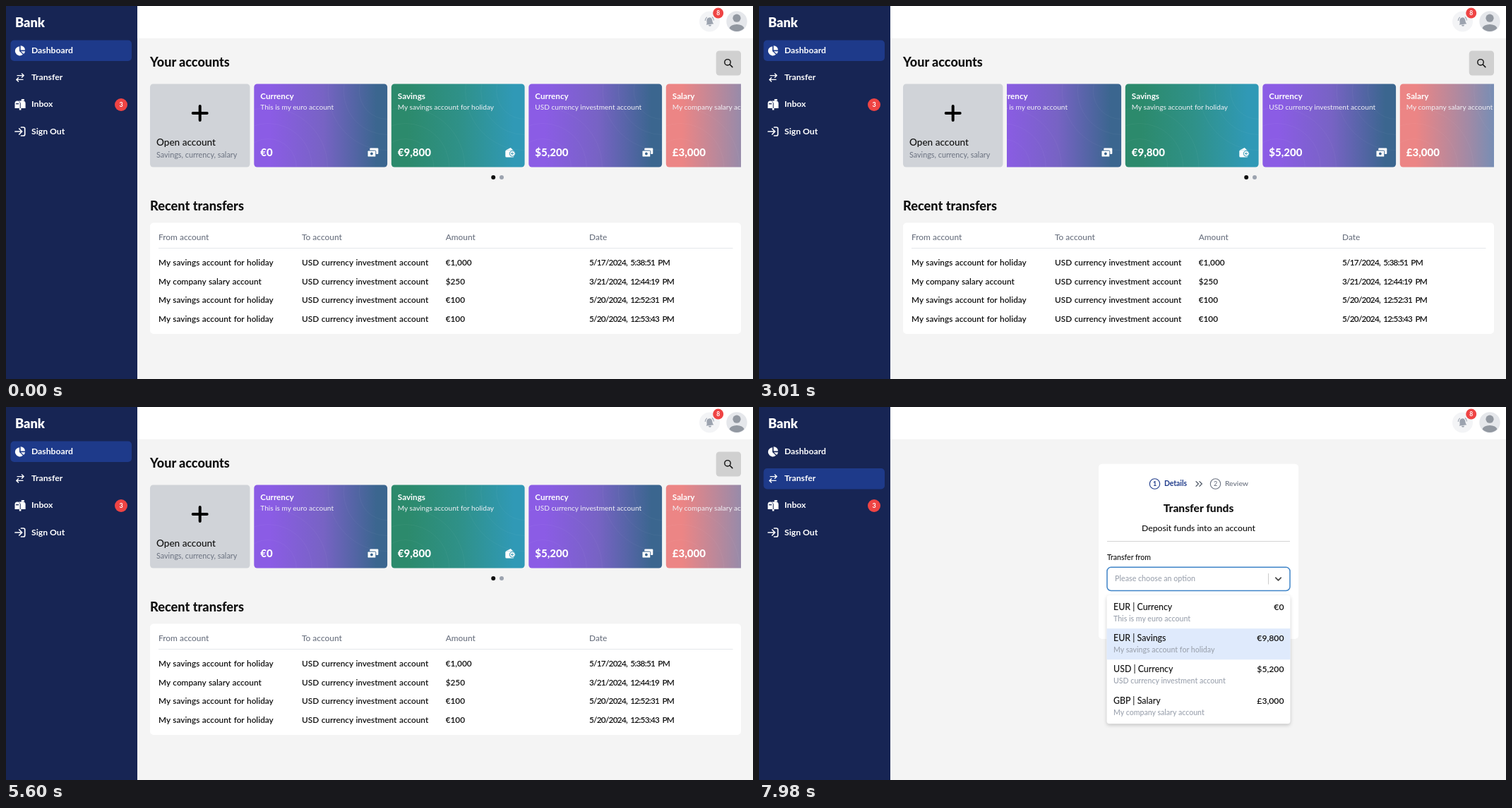
Animation, 1058 px wide and 529 px high, one loop 8 s. Source, as an HTML page:

```html
<!DOCTYPE html>
<html lang="en">
<head>
<meta charset="utf-8">
<title>Bank dashboard</title>
<style>
  html, body { margin: 0; width: 100%; height: 100%; overflow: hidden; background: #f4f4f4; }
  svg { display: block; width: 1058px; height: 529px; font-family: Lato, sans-serif; }
  text { white-space: pre; }
  .row { word-spacing: .6px; }
  .date { letter-spacing: -.75px; word-spacing: 2px; }
  .line { fill: none; stroke-linecap: round; stroke-linejoin: round; }
</style>
</head>
<body>
<svg id="stage" viewBox="0 0 1058 529"></svg>
<script>
const LOOP = 8000;
const NAVY = '#172554', BLUE = '#1e3a8a', RED = '#ef4444', INK = '#101010',
      GREY = '#6b7280', SOFT = '#9ca3af';

const text = (x, y, str, size, weight = 500, fill = INK, extra = '') =>
  `<text x="${x}" y="${y}" font-size="${size}" font-weight="${weight}" fill="${fill}" ${extra}>${str}</text>`;
const rect = (x, y, w, h, r, fill, extra = '') =>
  `<rect x="${x}" y="${y}" width="${w}" height="${h}" rx="${r}" fill="${fill}" ${extra}/>`;
const circle = (x, y, r, fill, extra = '') =>
  `<circle cx="${x}" cy="${y}" r="${r}" fill="${fill}" ${extra}/>`;
const path = (d, fill, extra = '') => `<path d="${d}" fill="${fill}" ${extra}/>`;
const line = (d, color, width, extra = '') =>
  `<path class="line" d="${d}" stroke="${color}" stroke-width="${width}" ${extra}/>`;
const MID = 'text-anchor="middle"', END = 'text-anchor="end"';

// Sidebar and header
const navIcons = [
  path('M19 57.2V64l4.9 4.7A6.6 6.6 0 1 1 19 57.2Z', '#fff') +
    path('M20.6 56.2a6.4 6.4 0 0 1 6.4 6.4h-6.4Z', '#fff') +
    path('M21 64.2h6a6.4 6.4 0 0 1-1.9 3.9Z', '#fff'),
  line('M16 98.6h9M22.5 96l2.7 2.6-2.7 2.6M24 104.4h-9M17.5 101.8l-2.7 2.6 2.7 2.6', '#fff', 1.4),
  path('M12.5 138a3.6 3.6 0 0 1 7.2 0v7h-7.2Z', '#fff') +
    path('M18 134.4h6a3.6 3.6 0 0 1 3.6 3.6v7H20.7v-7a5 5 0 0 0-2.7-3.6Z', '#fff') +
    path('M21.8 132h4v2.6h-2.6v4h-1.4ZM18.8 145h2.6v2.6h-2.6Z', '#fff') +
    rect(14, 138, 4, 1.3, 0, NAVY),
  line('M13 178h9M18.7 174l4 4-4 4M21.5 172h3.2a2 2 0 0 1 2 2v8a2 2 0 0 1-2 2h-3.2', '#fff', 1.7)
];
const nav = ['Dashboard', 'Transfer', 'Inbox', 'Sign Out'].map((label, i) =>
  navIcons[i] + text(36, 66.7 + i * 38.3, label, 12.2, 700, '#fff')).join('');

const sidebar = rect(0, 0, 186, 529, 0, NAVY) +
  rect(6.5, 48.5, 171.5, 29.5, 5, BLUE, 'id="navHome"') +
  rect(6.5, 87, 171.5, 29.5, 5, BLUE, 'id="navTransfer"') +
  text(13, 30, 'Bank', 18.2, 900, '#fff') + nav +
  circle(163, 140, 9, RED) + text(163, 143.2, '3', 9, 700, '#fff', MID);

const header = rect(186, 0, 872, 45.7, 0, '#fff') +
  circle(996.5, 22, 14.5, '#f3f4f6') +
  path('M991 26c1.4-1.2 1.5-2.8 1.5-4.8 0-3 1.4-4.8 4-4.8s4 1.8 4 4.8c0 2 .1 3.6 1.5 4.8Z', SOFT, 'transform="rotate(-8 996 22)"') +
  path('M995 26.7h4a2 2 0 0 1-4 0Z', SOFT) +
  line('M990.3 20.5a6 6 0 0 1 2.2-4.4M1002.4 20a6 6 0 0 0-2.2-4.2', SOFT, 1.1) +
  circle(1008.7, 10, 7.5, RED) + text(1008.7, 13, '8', 8.5, 700, '#fff', MID) +
  circle(1035, 22, 14.7, '#e5e7eb') + circle(1035, 17.2, 5.6, '#9298a1') +
  path('M1024.5 31.5a10.6 6.3 0 0 1 21 0a14.7 14.7 0 0 1-21 0Z', '#9298a1');

// Account cards, each drawn at its own origin
const icons = {
  cash: seam => rect(164, 91, 12, 8.5, 1, '#fff') +
    rect(160.7, 94.5, 11.8, 9, 1.2, '#fff', `stroke="${seam}" stroke-width="1"`) +
    circle(166.6, 99, 1.9, seam),
  wallet: seam => path('M162 94l7-3.6 3.4 3.6Z', '#fff') + rect(161.5, 94, 12, 10, 1.5, '#fff') +
    circle(171.5, 98.8, 4, '#fff', `stroke="${seam}" stroke-width="1"`) +
    line('M170 98.8h3M171.5 97.5l-1.6 1.3 1.6 1.3', seam, 1),
  receipt: seam => path('M162.8 91l1.8 1 1.8-1 1.9 1 1.9-1 1.8 1 1.8-1v14l-1.8-1-1.8 1-1.9-1-1.9 1-1.8-1-1.8 1Z', '#fff') +
    line('M165.5 95.2h5.6M165.5 98h5.6M165.5 100.8h5.6', seam, 1)
};
const tints = {
  violet: ['#8b5ce5', '#7763c4', '#3b668f'],
  green: ['#2c8a6c', '#2f9189', '#3099b6'],
  coral: ['#ec8585', '#a08aa6', '#4792c5']
};
const gradients = Object.entries(tints).map(([id, [a, b, c]]) =>
  `<linearGradient id="${id}">
     <stop offset=".12" stop-color="${a}"/><stop offset=".52" stop-color="${b}"/><stop offset=".92" stop-color="${c}"/>
   </linearGradient>`).join('');
const ripples = [40, 62, 84].map(r =>
  circle(20, 118, r, 'none', 'stroke="#fff" stroke-opacity=".04"') +
  circle(189, 10, r, 'none', 'stroke="#fff" stroke-opacity=".04"')).join('');

const accounts = [
  ['EUR', 'Currency', 'This is my euro account', '€0', 'violet', 'cash'],
  ['EUR', 'Savings', 'My savings account for holiday', '€9,800', 'green', 'wallet'],
  ['USD', 'Currency', 'USD currency investment account', '$5,200', 'violet', 'cash'],
  ['GBP', 'Salary', 'My company salary account', '£3,000', 'coral', 'receipt']
];
const cards = accounts.map(([, kind, note, sum, tint, icon], i) =>
  `<g transform="translate(${351.3 + i * 194.5} 110.5)">
    ${rect(0, 0, 188.8, 118, 4.5, `url(#${tint})`)}<g clip-path="url(#cardClip)">${ripples}</g>
    ${text(9, 21, kind, 11.7, 700, '#fff')}${text(9, 36.7, note, 10.1, 400, '#f1f1f6')}
    ${text(9, 102.5, sum, 15, 800, '#fff')}${icons[icon](tints[tint][2])}
  </g>`).join('');

// Transfers table
const columns = [216, 419, 622.7, 826];
const savings = accounts[1][2], usd = accounts[2][2], salary = accounts[3][2];
const transfers = [
  [savings, usd, '€1,000', '5/17/2024, 5:38:51 PM'],
  [salary, usd, '$250', '3/21/2024, 12:44:19 PM'],
  [savings, usd, '€100', '5/20/2024, 12:52:31 PM'],
  [savings, usd, '€100', '5/20/2024, 12:53:43 PM']
];
const cellClasses = ['row', 'row', 'amount', 'date'];
const table = rect(204, 307.5, 837, 157.5, 5, '#fff') +
  ['From account', 'To account', 'Amount', 'Date'].map((h, i) => text(columns[i], 332, h, 11.9, 500, GREY)).join('') +
  rect(216, 343, 813.5, 1, 0, '#e5e7eb') +
  transfers.map((row, r) => row.map((cell, c) =>
    text(columns[c], 368 + r * 26.55, cell, 11.8, 600, INK, `class="${cellClasses[c]}"`)).join('')).join('');

const home = text(204, 86, 'Your accounts', 18, 800) +
  rect(1005.7, 63.5, 35.3, 35, 4.5, '#d0d0d0', 'id="search"') +
  circle(1022, 79.8, 4.2, 'none', `stroke="${INK}" stroke-width="1.4"`) + line('M1025.2 83l3.6 3.6', INK, 1.5) +
  rect(204, 110.5, 141.5, 118, 4.5, '#d0d3d8') +
  line('M274.7 142v20M264.7 152h20', '#000', 4) +
  text(213, 198, 'Open account', 13.6) + text(213, 215, 'Savings, currency, salary', 10.8, 400, GREY) +
  `<g clip-path="url(#rail)"><g id="slider">${cards}</g></g>` +
  circle(690.2, 243, 3, INK, 'id="dotA"') + circle(702, 243, 3, SOFT, 'id="dotB"') +
  text(204, 289.5, 'Recent transfers', 18.2, 800) + table;

// Transfer form
const step = (x, n, label, color, weight) =>
  circle(x, 109, 7.2, 'none', `stroke="${color}" stroke-width="1.1"`) +
  text(x, 112.2, n, 9, weight, color, MID) + text(x + 13.4, 112.3, label, 10.4, weight, color);

const form = rect(481, 80.7, 283, 248.3, 5, '#fff') +
  step(560.5, '1', 'Details', BLUE, 700) + step(646.5, '2', 'Review', GREY, 500) +
  line('M619 105.6l3.4 3.4-3.4 3.4M623.9 105.6l3.4 3.4-3.4 3.4', '#4b5563', 1.3) +
  text(622.5, 148.7, 'Transfer funds', 15.6, 800, INK, MID) +
  text(622.5, 176, 'Deposit funds into an account', 12.2, 500, INK, MID) +
  rect(493, 190, 259, 1, 0, '#d4d4d4') + text(493, 216.7, 'Transfer from', 10.5) +
  rect(493, 227.3, 259, 33.2, 5.5, '#fff', 'id="field" stroke="#cccccc" stroke-width="1.1"') +
  text(504, 247.2, 'Please choose an option', 10.7, 500, SOFT) +
  rect(721, 236, 1, 15.5, 0, '#cccccc') +
  line('M731.8 242.2l3.7 3.7 3.7-3.7', '#bdbdbd', 1.8, 'id="arrow"') +
  rect(493, 281.5, 259, 29.5, 5, '#1d4ed8') +
  text(622.5, 299.5, 'Continue', 10.4, 700, '#fff', MID);

const menu = rect(492.5, 267, 260, 182.3, 4, '#fff', 'style="filter:drop-shadow(0 2px 2.5px rgba(0,0,0,.2))"') +
  rect(492.5, 270, 260, 44, 0, '#dfeafc', 'id="pick"') +
  accounts.map(([code, kind, note, sum], i) => {
    const y = 288 + i * 44.2;
    return text(502, y, `${code} | ${kind}`, 12.4) + text(743.5, y, sum, 12.2, 600, INK, END) +
      text(502, y + 16, note, 10.6, 500, SOFT);
  }).join('');

document.getElementById('stage').innerHTML =
  `<defs>${gradients}
    <clipPath id="rail">${rect(351.3, 105, 689.7, 130, 0, '#000')}</clipPath>
    <clipPath id="cardClip">${rect(0, 0, 188.8, 118, 4.5, '#000')}</clipPath>
  </defs>
  ${rect(0, 0, 1058, 529, 0, '#f4f4f4')}${header}${sidebar}
  <g id="home">${home}</g><g id="form">${form}</g><g id="menu">${menu}</g>`;

// Each step is [ms, value, easing to the next step]; without an easing the value holds.
function play(id, prop, steps) {
  const frames = [...steps, [LOOP, steps[steps.length - 1][1]]].map(([ms, value, easing = 'step-end']) =>
    ({ offset: ms / LOOP, [prop]: value, easing }));
  document.getElementById(id).animate(frames, { duration: LOOP, iterations: Infinity });
}
const shift = x => `translateX(${x}px)`;
const OPEN = 7280, SWITCH = 6300;

play('slider', 'transform', [
  [0, shift(0)], [1400, shift(0), 'linear'], [1680, shift(-46.5), 'ease-out'], [1960, shift(-82.5)],
  [2800, shift(-82.5), 'ease-in-out'], [3150, shift(0)]
]);
play('dotA', 'fill', [[0, INK], [1650, SOFT], [2960, INK]]);
play('dotB', 'fill', [[0, SOFT], [1650, INK], [2960, SOFT]]);
play('search', 'fill', [
  [0, '#d0d0d0'], [3290, '#d0d0d0', 'ease'], [3440, '#c4c8cd'],
  [4960, '#c4c8cd', 'ease'], [5110, '#d0d0d0']
]);
play('navTransfer', 'opacity', [[0, 0], [5600, 0, 'ease'], [5740, 1]]);
play('navHome', 'opacity', [[0, 1], [6265, 1, 'linear'], [6370, 0]]);
play('home', 'opacity', [[0, 1], [SWITCH, 0]]);
play('form', 'opacity', [[0, 0], [SWITCH, 1]]);
play('menu', 'opacity', [[0, 0], [OPEN, 1]]);
play('field', 'stroke', [[0, '#cccccc'], [OPEN, '#cccccc', 'ease'], [OPEN + 100, '#3f84c8']]);
play('field', 'strokeWidth', [[0, '1.1px'], [OPEN, '1.5px']]);
play('arrow', 'stroke', [[0, '#bdbdbd'], [OPEN, '#bdbdbd', 'ease'], [OPEN + 150, '#4b4b4b']]);
play('pick', 'transform', [[0, 'translateY(0px)'], [7910, 'translateY(44.2px)']]);
</script>
</body>
</html>
```
